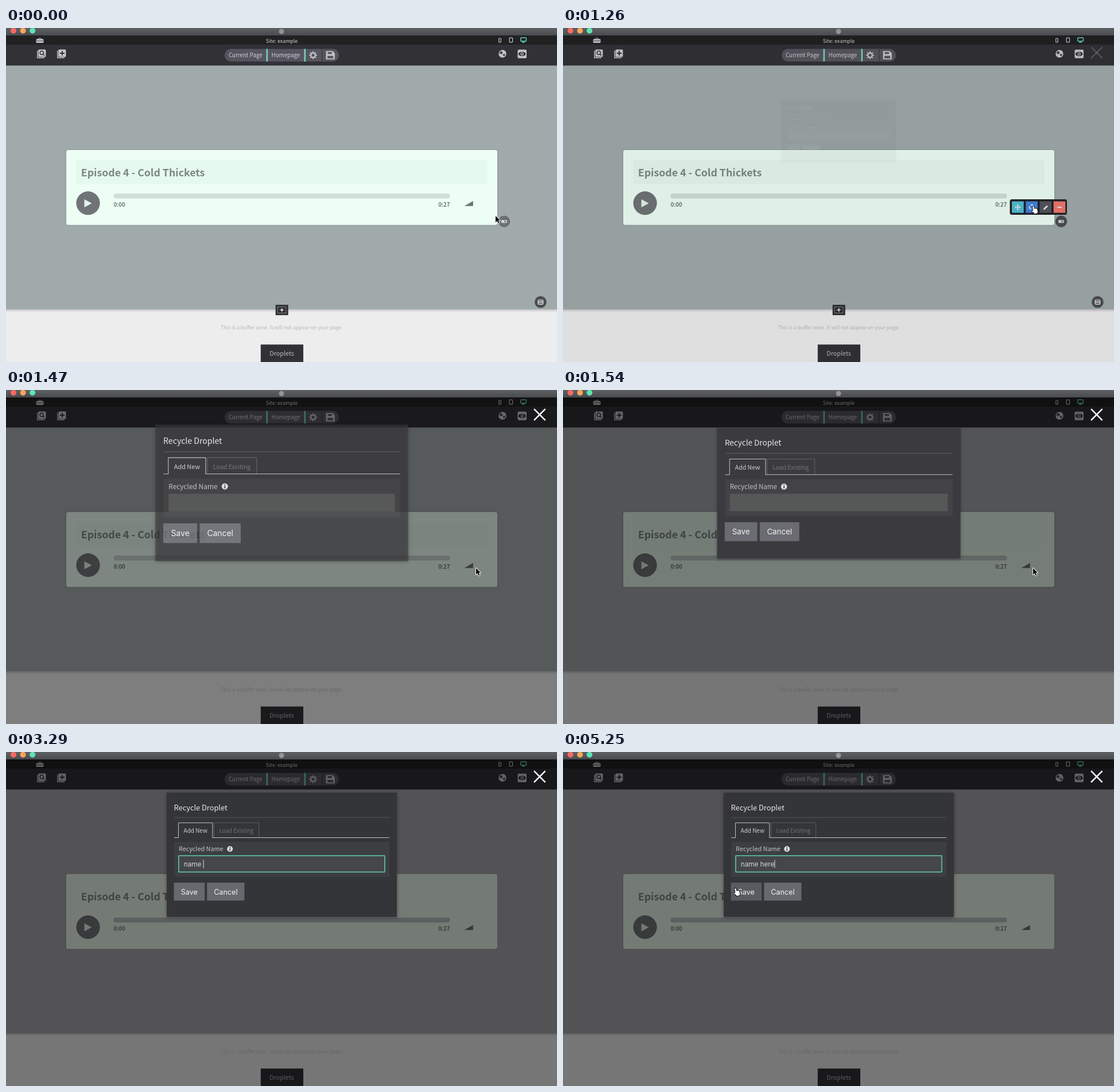
An HTML page with a canvas for the animation above (5.32 s loop, 960 by 583 pixels).

```html
<!DOCTYPE html>
<html lang="en">
<head>
<meta charset="utf-8">
<title>Recycle a droplet</title>
<style>
html, body { margin: 0; width: 100%; height: 100%; overflow: hidden; background: #ededed; }
canvas { display: block; width: 960px; height: 583px; }
</style>
</head>
<body>
<canvas id="stage" width="960" height="583"></canvas>
<script>
const ctx = document.getElementById('stage').getContext('2d');
const LOOP = 5320, STEP = 70;
const OPEN = 1205;              // the modal starts to appear
const UI = '"Noto Sans CJK JP", "Noto Sans CJK SC", "Noto Sans CJK", "Open Sans", sans-serif';
const SYS = 'Inter, "Liberation Sans", sans-serif';
const MINT = '#62cfb0', INK = '#c6c7ca', BAR = '#313136';

// ---- timing ----
const clamp = v => Math.max(0, Math.min(1, v));
const ramp = (t, a, b) => clamp((t - a) / (b - a));
const smooth = v => v * v * (3 - 2 * v);
const easeOut = v => 1 - (1 - v) ** 2;
const backOut = (v, c = 1.7) => 1 + (c + 1) * (v - 1) ** 3 + c * (v - 1) ** 2;

const veil = t => 0.5 * easeOut(ramp(t, OPEN + 37, OPEN + 335));
const reveal = t => ramp(t, OPEN + 35, OPEN + 155);

function mix(a, b, k) {
  return `rgb(${a.map((v, i) => Math.round(v + (b[i] - v) * k)).join(',')})`;
}
const white = a => `rgba(255,255,255,${a})`;

// ---- drawing ----
function rect(x, y, w, h, fill) {
  ctx.fillStyle = fill;
  ctx.fillRect(x, y, w, h);
}
function round(x, y, w, h, r, fill) {
  ctx.beginPath();
  ctx.roundRect(x, y, w, h, r);
  ctx.fillStyle = fill;
  ctx.fill();
}
function frame(x, y, w, h, r, color, width = 1) {
  ctx.beginPath();
  ctx.roundRect(x, y, w, h, r);
  ctx.strokeStyle = color;
  ctx.lineWidth = width;
  ctx.stroke();
}
function disc(x, y, r, fill, ry = r) {
  ctx.beginPath();
  ctx.ellipse(x, y, r, ry, 0, 0, 7);
  ctx.fillStyle = fill;
  ctx.fill();
}
function arc(x, y, r, from, to, color, width) {
  ctx.beginPath();
  ctx.arc(x, y, r, from, to);
  ctx.strokeStyle = color;
  ctx.lineWidth = width;
  ctx.stroke();
}
function path(points, close) {
  ctx.beginPath();
  for (let i = 0; i < points.length; i += 2) ctx.lineTo(points[i], points[i + 1]);
  if (close) ctx.closePath();
}
function poly(points, fill) {
  path(points, true);
  ctx.fillStyle = fill;
  ctx.fill();
}
function line(points, color, width = 1) {
  path(points);
  ctx.strokeStyle = color;
  ctx.lineWidth = width;
  ctx.stroke();
}
function plus(x, y, r, color, width) {
  line([x - r, y, x + r, y], color, width);
  line([x, y - r, x, y + r], color, width);
}
// draws n copies of a part turned around a centre
function spin(x, y, n, part) {
  for (let i = 0; i < n; i++) {
    ctx.save();
    ctx.translate(x, y);
    ctx.rotate(i * 2 * Math.PI / n);
    part();
    ctx.restore();
  }
}
function text(str, x, y, size, color, { weight = 400, family = UI, align = 'left' } = {}) {
  // the CJK family sets its Latin letters larger than the plain em
  const px = family === UI ? size / 1.117 : size;
  ctx.font = `${weight} ${px}px ${family}`;
  ctx.textAlign = align;
  ctx.fillStyle = color;
  ctx.fillText(str, x, y);
}

// ---- window chrome ----
function titleBar() {
  const g = ctx.createLinearGradient(0, 0, 0, 13);
  g.addColorStop(0, '#5e6163');
  g.addColorStop(1, '#4a4b4f');
  rect(0, 0, 960, 13, g);
  ['#f96a60', '#f9a65c', '#5ce5b3'].forEach((c, i) => disc(13 + 16.6 * i, 4.8, 5, c));
  disc(480, 6, 4.5, '#929496');
}

function pageIcon(x) {
  line([x - 7.2, 39.5, x - 7.2, 52, x + 5, 52], INK, 1.4);
  round(x - 5.6, 37.5, 13, 13, 1.5, INK);
}

function header() {
  rect(0, 13, 960, 16, '#212122');
  rect(0, 29, 960, 36.5, BAR);
  text('Site: example', 480.5, 25.5, 9.9, '#d6d6d8', { align: 'center' });

  // toolbox and devices
  frame(56.5, 17.8, 5, 3, 1, INK);
  round(52.5, 19.3, 13, 6.7, 1.5, INK);
  line([53, 22.5, 65, 22.5], '#212122', 0.8);
  frame(858.7, 18, 3.6, 7, 1, INK, 1.2);
  frame(877, 17.2, 5.6, 7.6, 1, INK, 1.2);
  frame(896.8, 17, 9.6, 6, 0.8, MINT, 1.5);
  rect(899, 24, 5, 1.6, MINT);

  // find and add
  pageIcon(62);
  arc(62.3, 43.4, 3.1, 0, 7, BAR, 1.4);
  line([64.5, 45.7, 67, 48.3], BAR, 1.6);
  pageIcon(97);
  plus(97.9, 44, 4, BAR, 2);

  // page pill
  round(381, 36.5, 199, 22, 11, '#56555f');
  for (const x of [453.5, 519.5]) rect(x, 36.5, 2.6, 22, '#74d3b8');
  rect(550, 36.5, 1.4, 22, '#3a3a41');
  text('Current Page', 388, 51.3, 10.9, '#d3d3d7');
  text('Homepage', 462.6, 51.3, 10.9, '#d3d3d7');
  spin(535, 47.5, 8, () => rect(3, -1, 3.8, 2, INK));
  disc(535, 47.5, 4.8, INK);
  disc(535, 47.5, 2.7, '#56555f');
  poly([557.6, 40.2, 569, 40.2, 572.8, 44, 572.8, 54.8, 557.6, 54.8], INK);
  rect(560.5, 42, 7.5, 3.4, '#56555f');
  rect(560, 48.6, 10.2, 4.4, '#56555f');

  // globe and eye
  disc(865, 45, 6.7, INK);
  disc(862.6, 43, 2.6, '#4b4b50');
  disc(867.8, 47, 2, '#4b4b50');
  round(891.5, 37.7, 15.5, 15, 2, INK);
  disc(899.2, 45.2, 6.3, BAR, 3.8);
  disc(899.2, 45.2, 2.6, INK);
  disc(899.2, 45.2, 1.4, BAR);
}

// ---- page ----
function player(cool) {
  ctx.save();
  ctx.shadowColor = 'rgba(0,0,0,.18)';
  ctx.shadowBlur = 3;
  round(105, 213, 751, 130.7, 3.5, mix([237, 255, 245], [234, 248, 236], cool));
  ctx.restore();
  rect(122, 231, 717, 41.5, `rgba(120,150,130,${0.06 * (1 - cool)})`);
  text('Episode 4 - Cold Thickets', 130.8, 258.6, 19.8, '#7c8983', { weight: 700 });
  disc(143, 305.7, 20.6, '#707476');
  poly([136.5, 299, 149.5, 306, 136.5, 313], '#e4f3eb');
  round(187.5, 289, 586, 8.4, 4, mix([207, 224, 214], [181, 192, 193], cool));
  text('0:00', 187.4, 312.2, 10.8, '#6c7671', { weight: 700 });
  text('0:27', 773.4, 312.2, 10.8, '#6c7671', { weight: 700, align: 'right' });
  poly([798.5, 310.8, 813.8, 302, 813.8, 310.8], '#6c7372');
}

function toolbar() {
  const ink = '#e6eaee', mid = 312.8;
  const at = i => 792.4 + 24.2 * i;
  round(778.5, 299, 99.5, 27, 3.5, '#222227');
  ['#52bdd2', '#3f83e2', '#54545d', '#f0766c']
    .forEach((c, i) => rect(at(i) - 10.3, 302.6, 20.6, 20, c));
  plus(at(0), mid, 4, ink, 1.4);
  spin(at(0), mid, 4, () => poly([3, -2.2, 5.4, 0, 3, 2.2], ink));
  spin(at(1), mid, 3, () => arc(0, 0, 3.8, 0, 1.5, ink, 1.9));
  line([838.8, 315.6, 844, 310.4], ink, 2.8);
  poly([836.8, 317.6, 837.6, 314.6, 839.8, 316.8], ink);
  rect(at(3) - 4, mid - 1, 8, 2, ink);
}

function handles(t) {
  const open = ramp(t, 350, 490);
  disc(868, 337.6, 10.2, mix([108, 112, 114], [75, 76, 80], open));
  round(863.2, 335.2, 9.6, 5, 1, '#d9dcdd');
  for (const x of [868, 870]) rect(x, 336.2, 1.1, 3, '#55575a');
  ctx.globalAlpha = open;
  toolbar();
  ctx.globalAlpha = 1;

  disc(931.4, 478.4, 10.4, '#4d4e52');
  frame(927.2, 474.8, 8.4, 7.2, 1, '#e8e9ea', 1.3);
  rect(927, 477.4, 9, 1.9, '#e8e9ea');

  rect(469.7, 483.2, 22, 18, '#2d2d32');
  ctx.setLineDash([2, 1.3]);
  frame(473.3, 486.8, 14.6, 10.8, 0, INK);
  ctx.setLineDash([]);
  plus(480.6, 492.2, 3.2, '#e4e4e6', 1.5);
}

function page(t) {
  const cool = ramp(t, OPEN + 125, OPEN + 475);
  rect(0, 65, 960, 518, '#ededed');
  const shade = ctx.createLinearGradient(0, 491, 0, 496);
  shade.addColorStop(0, 'rgba(0,0,0,.18)');
  shade.addColorStop(1, 'rgba(0,0,0,0)');
  rect(0, 491, 960, 5, shade);
  rect(0, 65, 960, 426, mix([160, 170, 170], [168, 168, 171], cool));
  header();
  player(cool);
  if (t < OPEN + 265) handles(t);
  text('This is a buffer zone. It will not appear on your page.', 480.4, 526, 9.86,
    mix([184, 184, 184], [205, 205, 205], cool), { align: 'center' });
  rect(443.8, 552.5, 74.2, 31, BAR);
  text('Droplets', 480.6, 572.2, 12.05, '#bcbcc0', { align: 'center' });
}

// ---- modal ----
function button(label, x, w, fill) {
  rect(x, 228, w, 31.3, fill);
  text(label, x + w / 2, 248.5, 12.6, '#f2f2f4', { family: SYS, align: 'center' });
}

function modal(t) {
  const zoom = backOut(ramp(t, OPEN, OPEN + 435));
  const focus = t >= 2240;
  const plain = 'rgba(225,230,240,.29)';
  ctx.save();
  ctx.translate(480.5, 179.5);
  ctx.scale(zoom, zoom);
  ctx.translate(-480.5, -179.5);

  ctx.save();
  ctx.globalAlpha = ramp(t, OPEN, OPEN + 335) ** 2;
  ctx.shadowColor = 'rgba(0,0,0,.4)';
  ctx.shadowBlur = 6;
  ctx.shadowOffsetY = 1;
  rect(280, 71, 401, 217, mix([59, 58, 63], [52, 53, 56], ramp(t, 1540, 1750)));
  ctx.restore();

  ctx.globalAlpha = reveal(t);
  text('Recycle Droplet', 292.6, 101.7, 14.3, '#e9e9eb');
  line([293, 114.3, 668, 114.3], white(0.17));

  // tabs
  const top = 123.6, base = 149.5;
  line([362.5, base, 362.5, top, 440.6, top, 440.6, base], white(0.2));
  line([293, base, 300.5, base, 300.5, top, 359.8, top, 359.8, base, 668, base], '#bfc0c3');
  text('Add New', 309.6, 141.4, 11.1, '#cfcfd2');
  text('Load Existing', 371.5, 141.4, 10.9, white(0.3));

  // field
  rect(293, 157, 375, 61, white(0.045));
  text('Recycled Name', 300.9, 173.4, 12.1, '#c3c4c8');
  disc(390.2, 169.2, 5, '#dcdde0');
  rect(389.4, 168.6, 1.7, 3.6, '#3c3d41');
  rect(389.4, 166, 1.7, 1.6, '#3c3d41');
  rect(301, 181, 359, 28.6, focus ? white(0.04) : 'rgba(225,255,215,.11)');
  if (focus) {
    frame(300.9, 181, 359, 28.6, 0.5, MINT, 1.5);
    const name = 'name here';
    const typed = name.slice(0, Math.floor(name.length * ramp(t, 2600, 3640)));
    text(typed, 309.8, 199.7, 11.7, '#d6d7da', { family: SYS });
    rect(309.8 + ctx.measureText(typed).width, 188.5, 1, 14, '#e6e6e8');
  }

  button('Save', 292.5, 53.7, t >= 4970 ? '#5a5b60' : plain);
  button('Cancel', 350.2, 65.2, plain);
  ctx.restore();
}

function closeMark(t) {
  ctx.globalAlpha = reveal(t);
  for (const s of [-1, 1]) line([920, 43 - 9.8 * s, 939.6, 43 + 9.8 * s], '#ffffff', 2.5);
  ctx.globalAlpha = 1;
}

// ---- pointer ----
// each move: start, end, place reached
const HOME = [853, 328];
const MOVES = [[0, 350, 866, 336], [600, 1050, 819, 311], [1750, 2170, 498, 198],
  [3640, 4060, 235, 171], [4480, 4980, 300, 238]];

function place(t) {
  return MOVES.reduce(([x, y], [a, b, nx, ny]) => {
    const k = smooth(ramp(t, a, b));
    return [x + (nx - x) * k, y + (ny - y) * k];
  }, HOME);
}

function beam() {
  for (const [color, w] of [['#101012', 3], ['#f4f4f4', 1.2]]) {
    line([0, -5, 0, 6], color, w);
    for (const s of [-1, 1]) line([-2.8, 0.5 + 6.5 * s, 0, 0.5 + 5.3 * s, 2.8, 0.5 + 6.5 * s], color, w);
  }
}

function hand() {
  ctx.rotate(-0.2);
  for (const [color, grow] of [['#17181a', 1], ['#ffffff', 0]]) {
    const part = (x, y, w, h, r) =>
      round(x - grow, y - grow, w + 2 * grow, h + 2 * grow, r + grow, color);
    part(-1, 0, 2.2, 9, 1.1);
    part(-1, 5, 7, 8.5, 2.5);
    part(-3.4, 7.4, 4, 3, 1.4);
  }
}

function arrow() {
  path([0, 0, 0, 11.2, 2.6, 8.8, 4.5, 13, 6.4, 12.2, 4.5, 8, 8, 8], true);
  ctx.lineJoin = 'round';
  ctx.strokeStyle = '#f0f2f2';
  ctx.lineWidth = 2;
  ctx.stroke();
  ctx.fillStyle = '#0b0b0c';
  ctx.fill();
}

function pointer(t) {
  if (t >= 2660 && t < 3640) return;   // hidden while typing
  const onButton = (t >= 980 && t < 1330) || t >= 4970;
  const onField = t >= 2100 && t < 2660;
  ctx.save();
  ctx.translate(...place(t));
  (onButton ? hand : onField ? beam : arrow)();
  ctx.restore();
}

function draw(t) {
  page(t);
  rect(0, 13, 960, 570, `rgba(0,0,0,${veil(t)})`);
  titleBar();
  if (t > OPEN) {
    closeMark(t);
    modal(t);
  }
  pointer(t);
}

const start = performance.now();
function tick(now) {
  const t = Math.max(0, now - start) % LOOP;
  draw(Math.floor(t / STEP) * STEP);
  requestAnimationFrame(tick);
}
draw(0);
requestAnimationFrame(tick);
</script>
</body>
</html>
```
